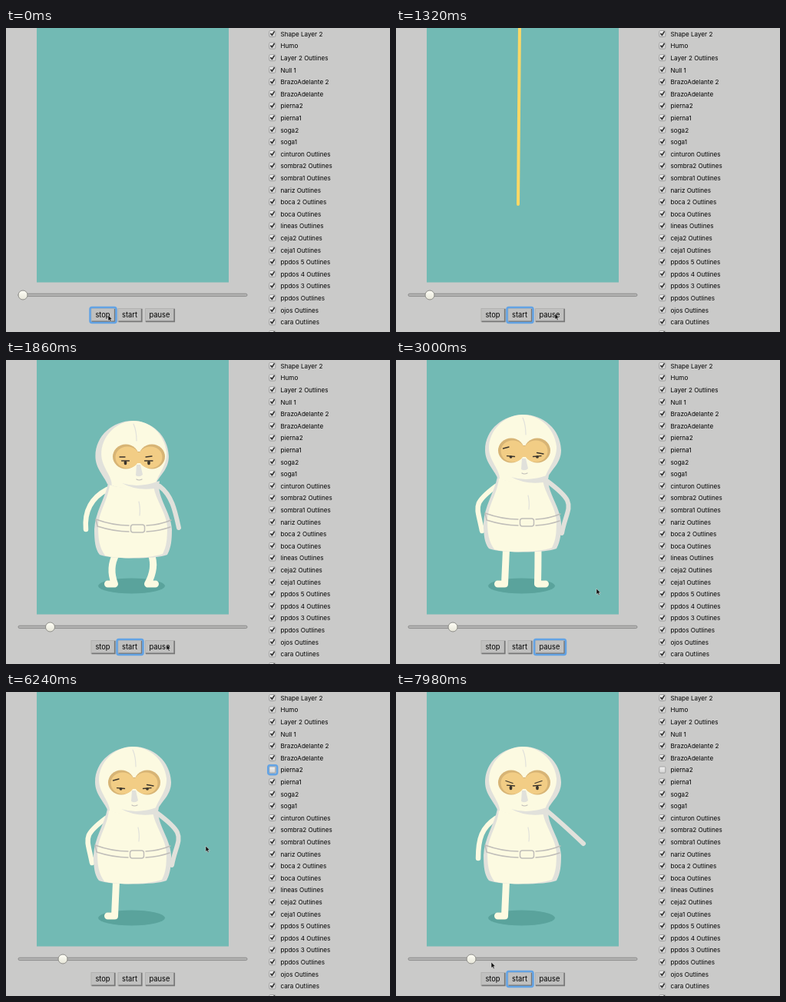
An HTML page that plays this animation: 500 px wide and 395 px high, repeating every 8000 ms.

```html
<!DOCTYPE html>
<html lang="en">
<head>
<meta charset="utf-8">
<title>Layer player</title>
<style>
  html, body { margin: 0; width: 100%; height: 100%; overflow: hidden; background: #cacac9; }
  svg { display: block; width: 500px; height: 395px; font-family: Inter, "Open Sans", sans-serif; }
  .label { font-size: 8.1px; }
  .caption { font-size: 9.3px; }
  .line { fill: none; stroke-linecap: round; stroke-linejoin: round; }
  .cream { fill: #fcfae1; }
  .shade { fill: #e1e1db; }
  .limb { stroke: #fcfae1; stroke-width: 9; }
  .ink { stroke: #3b352c; stroke-width: 1.3; }
  .seam { stroke: #c0beb9; stroke-width: 1.5; }
</style>
</head>
<body>
<svg viewBox="0 0 500 395">
  <defs>
    <clipPath id="panel"><rect x="40" width="250" height="330.4"/></clipPath>
    <linearGradient id="boxFill" x2="0" y2="1">
      <stop stop-color="#f2f2f2"/><stop offset="1" stop-color="#d2d2d2"/>
    </linearGradient>
    <linearGradient id="thumbFill" x2="0" y2="1">
      <stop stop-color="#fffff6"/><stop offset="1" stop-color="#e6e5d8"/>
    </linearGradient>
  </defs>

  <rect width="500" height="395" fill="#cacac9"/>
  <g clip-path="url(#panel)">
    <rect x="40" width="250" height="331" fill="#72bab4"/>
    <ellipse id="shadow" cx="163.5" cy="293.5" rx="43.5" ry="10" fill="#5aa39c"/>
    <path id="rope" class="line" stroke="#fbd866" stroke-width="4"/>
    <g id="figure">
      <path id="legL" class="line limb"/>
      <path id="legR" class="line limb"/>
      <g id="upper">
        <path id="armR" class="line" stroke="#e1e1db" stroke-width="6"/>
        <path id="armL" class="line limb" style="stroke-width:6.5"/>
        <path class="shade" d="M132 152C128 172 115 190 114 212C114 226 115 238 121 245C135 251 195 251 209 245C214 236 215 226 215 212C214 190 196 172 198 150Z"/>
        <path class="cream" d="M134 150C134 172 119 188 119 210C119 226 121 236 128 246C145 251 185 250 203 244C208 234 209 226 209 208C207 188 191 170 191 152Z"/>
        <g id="head">
          <path class="shade" d="M166 71C192 71 214 90 215 117C215 133 204 141 199 150C190 160 145 160 132 153C128 143 116 133 116 117C116 90 140 71 166 71Z"/>
          <path id="hood" class="cream" d="M164 71C187 71 206 88 209 112C210 130 196 142 194 154C180 160 150 160 135 155C136 143 121 131 121 114C121 92 140 72 164 71Z"/>
        </g>
        <path class="shade" d="M150 152Q172 159 199 149Q199 157 192 159Q168 162 150 152Z"/>
        <path class="line" stroke="#e1e1db" stroke-width="1.2" d="M165 75Q169 84 169 97M172 176Q174 184 173 194"/>
        <path class="line seam" d="M116 199Q138 207 159 207M182 207Q200 206 214 200M118 208Q140 215 159 215M182 215Q200 214 213 209M116 199L118 208"/>
        <rect class="seam cream" x="161.5" y="206" width="18" height="10" rx="3"/>
        <g id="face">
          <g fill="#d7b475">
            <ellipse cx="150" cy="117.5" rx="17" ry="16"/>
            <ellipse cx="184" cy="117.5" rx="17" ry="16"/>
            <rect x="160" y="111" width="14" height="15"/>
          </g>
          <g fill="#f2cd85">
            <ellipse cx="152" cy="118.5" rx="15.5" ry="14"/>
            <ellipse cx="182" cy="118.5" rx="15.5" ry="14"/>
            <rect x="160" y="112" width="14" height="14"/>
          </g>
          <path class="shade" d="M164 128H169L172 141Q168 145 163 142Z"/>
          <path class="line" stroke="#bfbdb7" stroke-width="1.2" d="M164 147Q167 149 171 147"/>
          <ellipse id="pupilL" rx="1.9" fill="#3b352c"/>
          <ellipse id="pupilR" rx="1.9" fill="#3b352c"/>
          <path id="lids" class="line ink"/>
          <path id="brows" class="line ink"/>
        </g>
      </g>
    </g>
  </g>

  <rect x="16" y="345.2" width="298" height="3.4" rx="1.7" fill="#b4b4b3" stroke="#858585" stroke-width=".9"/>
  <circle id="thumb" cy="347" r="6" fill="url(#thumbFill)" stroke="#858580" stroke-width=".9"/>
  <g id="buttons"></g>
  <g id="layers"></g>
  <rect id="ring" fill="none" stroke="#63a3e4" stroke-width="2.6" rx="2.5"/>
  <path id="cursor" fill="#111" stroke="#e8e8e8" stroke-width=".5" d="M0 0V7.6L1.7 6.1L3 8.8L4.2 8.2L3 5.6H5.3Z"/>
</svg>

<script>
const LOOP = 8000, STEP = 60;
const START = 440, PAUSE = 2520, RESUME = 7020;
const UNCHECK = 4300, RECHECK = 5000, UNCHECK_AGAIN = 5560;
const el = id => document.getElementById(id);
const set = (id, attrs) => {
  for (const key in attrs) el(id).setAttribute(key, attrs[key]);
};
const mix = (a, b, k) => a + (b - a) * k;

const layers = [
  "Shape Layer 2", "Humo", "Layer 2 Outlines", "Null 1", "BrazoAdelante 2", "BrazoAdelante",
  "pierna2", "pierna1", "soga2", "soga1", "cinturon Outlines", "sombra2 Outlines",
  "sombra1 Outlines", "nariz Outlines", "boca 2 Outlines", "boca Outlines", "lineas Outlines",
  "ceja2 Outlines", "ceja1 Outlines", "ppdos 5 Outlines", "ppdos 4 Outlines",
  "ppdos 3 Outlines", "ppdos Outlines", "ojos Outlines", "cara Outlines", "Null 2"
];
el("layers").innerHTML = layers.map((name, i) => {
  const y = 7.5 + i * 15.6;
  return `<rect x="342.8" y="${y - 4}" width="8" height="8" rx="1.3" fill="url(#boxFill)" stroke="#929292" stroke-width=".8"/>
    <path id="tick${i}" class="line" stroke="#333" stroke-width="1.7" d="M344.9 ${y}l1.5 1.8l2.8 -4.4"/>
    <text class="label" x="357.5" y="${y + 3.2}">${name}</text>`;
}).join("");

const buttons = [["stop", 110.5, 32], ["start", 145.5, 32], ["pause", 181, 39]];
el("buttons").innerHTML = buttons.map(([name, x, w]) =>
  `<rect x="${x}" y="364" width="${w}" height="18" fill="#c0c0bf"/>
   <path fill="none" stroke="#b2b2b1" d="M${x + .5} 382V364.5H${x + w}"/>
   <path fill="none" stroke="#777" stroke-width="1.7" d="M${x + 1} 381.3H${x + w - .8}V365"/>
   <text class="caption" text-anchor="middle" x="${x + w / 2 - .5}" y="376">${name}</text>`
).join("");

// Rows hold a time followed by values.
function sample(rows, time) {
  if (time <= rows[0][0]) return rows[0].slice(1);
  const i = rows.findIndex(row => row[0] > time);
  if (i < 0) return rows[rows.length - 1].slice(1);
  const from = rows[i - 1], to = rows[i];
  const k = (time - from[0]) / (to[0] - from[0]);
  const eased = k * k * (3 - 2 * k);
  return from.slice(1).map((v, j) => mix(v, to[j + 1], eased));
}

const pointer = [
  [120, 133, 373], [240, 163, 373], [600, 163, 373], [1000, 207, 371], [1320, 207, 371],
  [1860, 209, 369.5], [2560, 209, 369.5], [3000, 261, 297], [3720, 261, 297], [4120, 362, 92],
  [4270, 348, 99], [5720, 348, 99], [6020, 260, 200], [6360, 260, 200], [6860, 163, 371],
  [7100, 161, 371], [7700, 125, 352], [7980, 124, 351]
];
const ropeTip = [[440, -5], [760, 229], [1200, 229], [1380, -5]];
const fall = [[960, -310], [1290, 0]];
const crouch = [[1220, 0], [1350, 1.15], [1420, 1], [1660, -.15], [1800, 0]];

// Eyes: pupil spacing offset, pupil y, pupil height, then lid and brow ends.
const calm = [180, 125.5, 2.7, 123, 123, 142, 118, 149, 118, 176, 118, 184, 117];
const wry = [184, 126, 1.8, 124.7, 125.5, 139.5, 115, 147, 113, 183.5, 120.5, 192, 122];
const angry = [184, 124.5, 2.7, 121.2, 122, 143, 115.5, 152, 118.5, 181, 118.5, 190, 115.5];
const eyes = [[1500, ...calm], [1800, ...wry], [2250, ...wry], [2600, ...angry]];

const hangL = [131, 160, 108, 172, 101, 190, 103, 212];
const hipL = [130, 164, 98, 188, 106, 190, 112, 222];
const looseL = [130, 164, 112, 176, 107, 190, 107, 216];
const hangR = [199, 156, 215, 168, 219, 187, 224, 210];
const hipR = [195, 156, 239, 188, 223, 188, 216, 225];
const pointR = [196, 154, 212, 167, 228, 182, 244, 197];
const armL = [[1440, ...hangL], [1880, ...hipL], [2600, ...hipL], [3060, ...looseL]];
const armR = [[1440, ...hangR], [1880, ...hipR], [2400, ...hipR], [2840, ...pointR]];
const curve = p => `M${p[0]} ${p[1]}C${p.slice(2).join(" ")}`;

function drawEyes(a) {
  const [right, cy, ry, lidA, lidB, ...brow] = sample(eyes, a);
  set("pupilL", { cx: 149.5, cy, ry });
  set("pupilR", { cx: right, cy, ry });
  set("lids", {
    d: `M144.5 ${lidA}L154.5 ${lidB}M${right - 5.5} ${lidB}L${right + 5} ${lidA}`
  });
  set("brows", { d: `M${brow.slice(0, 4).join(" ")}M${brow.slice(4).join(" ")}` });
}

function drawFigure(a) {
  const [drop] = sample(fall, a), [bend] = sample(crouch, a), [tip] = sample(ropeTip, a);
  const near = 1 + drop / 310;

  set("shadow", { opacity: near, rx: 43.5 * near, ry: 10 * near });
  set("rope", { d: `M161 -5Q160 ${tip / 2} 159 ${tip}`, opacity: tip > -4 ? 1 : 0 });
  set("figure", { transform: `translate(0 ${drop})` });
  set("upper", { transform: `translate(${bend} ${8 * bend})` });
  set("head", { transform: `translate(${116 - .6 * bend} 0) scale(${1 - .035 * bend} 1) translate(-116 0)` });
  set("hood", { transform: `translate(${3 * bend} 0)` });
  set("face", { transform: `translate(${5 * bend} 0)` });
  set("legL", { d: `M143.5 ${246 + 6 * bend}Q${142.5 - 9 * bend} 270 141.5 291H132.5` });
  set("legR", { d: `M${185 + 4 * bend} ${246 + 6 * bend}Q${185 + 11 * bend} 270 184.5 291H194.5` });
  set("armL", { d: curve(sample(armL, a)) });
  set("armR", { d: curve(sample(armR, a)) });
  drawEyes(a);
}

function drawRing(t) {
  if (t >= UNCHECK && t < RESUME) {
    set("ring", { x: 341.3, y: 95.3, width: 11.8, height: 11.8 });
    return;
  }
  const active = t < 420 ? 0 : t < PAUSE || t >= RESUME ? 1 : 2;
  const [, x, w] = buttons[active];
  set("ring", { x: x - 1, y: 363, width: w + 2, height: 20 });
}

function render(t) {
  const played = Math.max(0, Math.min(t, PAUSE) - START) + Math.max(0, t - RESUME);
  const checked = t < UNCHECK || (t >= RECHECK && t < UNCHECK_AGAIN);
  const [x, y] = sample(pointer, t);
  drawFigure(played);
  drawRing(t);
  set("thumb", { cx: 22 + played * .025 });
  set("tick6", { opacity: checked ? 1 : 0 });
  set("legR", { opacity: checked ? 1 : 0 });
  set("cursor", { transform: `translate(${x} ${y})` });
}

const began = performance.now();
function tick() {
  const t = (performance.now() - began) % LOOP;
  render(Math.floor(t / STEP) * STEP);
  requestAnimationFrame(tick);
}
tick();
</script>
</body>
</html>
```
